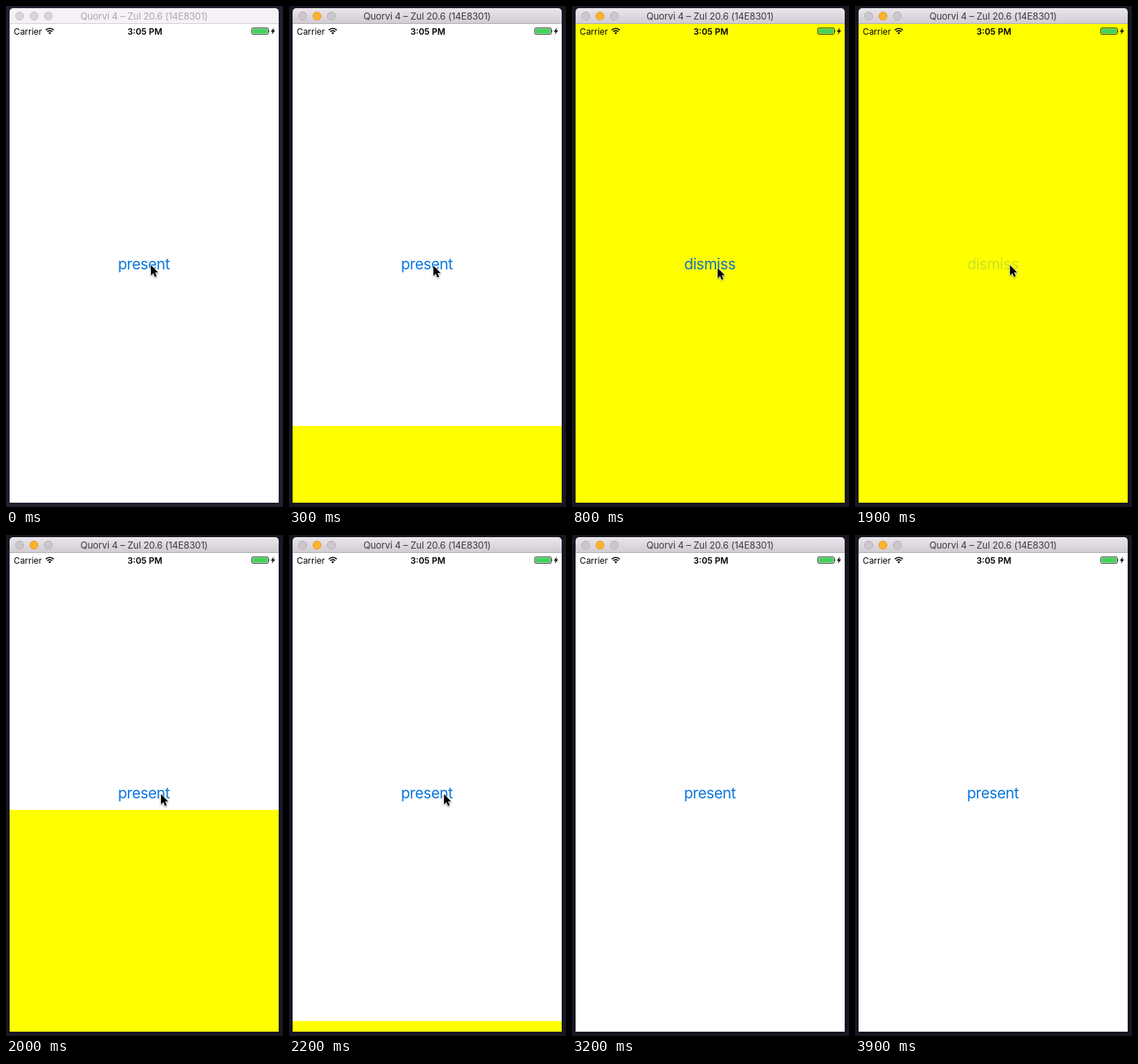
Recreate the animation shown at these times as an HTML page. Size 386 by 698 pixels, loop 4000 ms.

```html
<!DOCTYPE html>
<html lang="en">
<head>
<meta charset="utf-8">
<title>Modal sheet</title>
<style>
  html, body { margin: 0; width: 100%; height: 100%; overflow: hidden; }
  svg { display: block; width: 386px; height: 698px; font-family: Inter, Roboto, sans-serif; }
  text { text-anchor: middle; }
  .button { font-size: 21px; letter-spacing: -.45px; fill: #0a76dd; }
  #sheet .button { fill: #1470c4; }
  .pressed { opacity: .22; }
  #backdrop { fill: #171722; }
  #bar { fill: url(#chrome); }
  #edge { stroke: #b1acb2; }
  #title { font-size: 13px; letter-spacing: -.12px; fill: #3c393d; }
  .light { fill: #cbc7cd; stroke: #b3afb5; }
  #minimize { fill: #fdb32b; stroke: #df9c2c; }
  .inactive #backdrop { fill: #201f2e; }
  .inactive #bar { fill: #f6f1f6; }
  .inactive #edge { stroke: #d3ced4; }
  .inactive #title { fill: #aaa6ab; }
  .inactive .light, .inactive #minimize { fill: #d8d4d9; stroke: #c5c1c6; }
</style>
</head>
<body>
<svg id="stage" viewBox="0 0 386 698">
  <defs>
    <linearGradient id="chrome" x2="0" y2="1">
      <stop stop-color="#ebe6ec"/><stop offset="1" stop-color="#d0cbd1"/>
    </linearGradient>
    <clipPath id="screen"><path d="M5 25H380V692H5z"/></clipPath>
  </defs>

  <rect id="backdrop" width="386" height="698"/>
  <path id="bar" d="M5 25V8a5 5 0 0 1 5-5H375a5 5 0 0 1 5 5V25z"/>
  <path id="edge" d="M5 24.5H380"/>
  <circle class="light" cx="19" cy="14" r="5.6"/>
  <circle class="light" id="minimize" cx="39" cy="14" r="5.6"/>
  <circle class="light" cx="59" cy="14" r="5.6"/>
  <text id="title" x="192.5" y="19">Quorvi 4 – Zul 20.6 (14E8301)</text>

  <g clip-path="url(#screen)">
    <path d="M5 25H380V692H5z" fill="#fff"/>
    <text class="button" id="present" x="192" y="367">present</text>
    <g id="sheet">
      <path d="M5 25H380V692H5z" fill="#ff0"/>
      <text class="button" id="dismiss" x="192" y="367">dismiss</text>
    </g>
  </g>

  <g font-size="12">
    <text x="30.5" y="39.5">Carrier</text>
    <text x="193.5" y="39.5" font-weight="600">3:05 PM</text>
    <path d="M55.4 33.6a7.9 7.9 0 0 1 11.2 0M57.5 35.8a4.9 4.9 0 0 1 7 0" fill="none" stroke="#000" stroke-width="1.6"/>
    <path d="M59.1 37.5a2.7 2.7 0 0 1 3.8 0L61 39.6z"/>
    <rect x="342.5" y="30.5" width="23" height="9" rx="1.6" fill="none" stroke="#000" stroke-opacity=".75"/>
    <rect x="343.5" y="31.5" width="21" height="7" rx=".6" fill="#43d15b"/>
    <path d="M366 33.2q1.6 1.8 0 3.6z"/>
    <path d="M373.4 30L369 35.8H371.6L370.4 40L375 34H372.3z"/>
  </g>

  <path id="cursor" d="M0 0V14.2L3.3 11.2L5.7 16.6L8 15.6L5.7 10.3H10z" stroke="#fff" stroke-width="1.2" paint-order="stroke"
        style="filter: drop-shadow(0 1px 1px #0006)"/>
</svg>

<script>
const LOOP = 4000, TICK = 100, HEIGHT = 667;
const $ = id => document.getElementById(id);

// time, x, y of the pointer tip
const route = [
  [0, 202, 361], [400, 201, 362], [600, 201, 362], [800, 203, 365], [900, 203, 365],
  [1500, 216, 361], [2400, 216, 361], [2600, 304, 234], [2800, 390, 140]
];

function pointerAt(t) {
  const i = route.findIndex(p => p[0] > t);
  if (i < 0) return [390, 140];
  const [t0, x0, y0] = route[i - 1], [t1, x1, y1] = route[i];
  const k = (t - t0) / (t1 - t0);
  return [x0 + (x1 - x0) * k, y0 + (y1 - y0) * k];
}

const bezier = (u, a, b) => 3 * (1 - u) ** 2 * u * a + 3 * (1 - u) * u * u * b + u ** 3;

// System transition curve: cubic-bezier(.38, .7, .125, 1)
function ease(t, start, duration) {
  const x = Math.min(1, Math.max(0, (t - start) / duration));
  let low = 0, high = 1;
  for (let i = 0; i < 24; i++) {
    const mid = (low + high) / 2;
    if (bezier(mid, .38, .125) < x) low = mid; else high = mid;
  }
  return bezier(high, .7, 1);
}

function draw(now) {
  const t = Math.floor(now % LOOP / TICK) * TICK;
  const shown = t < 260 ? 0 : t < 1900 ? ease(t, 260, 500) : 1 - ease(t, 1900, 450);
  const [x, y] = pointerAt(t);
  $('stage').classList.toggle('inactive', t < 100);
  $('present').classList.toggle('pressed', t === 200);
  $('dismiss').classList.toggle('pressed', t === 1900);
  $('sheet').setAttribute('transform', `translate(0 ${HEIGHT * (1 - shown)})`);
  $('cursor').setAttribute('transform', `translate(${x} ${y})`);
}

const start = performance.now();
function loop() {
  draw(performance.now() - start);
  requestAnimationFrame(loop);
}
loop();
</script>
</body>
</html>
```
